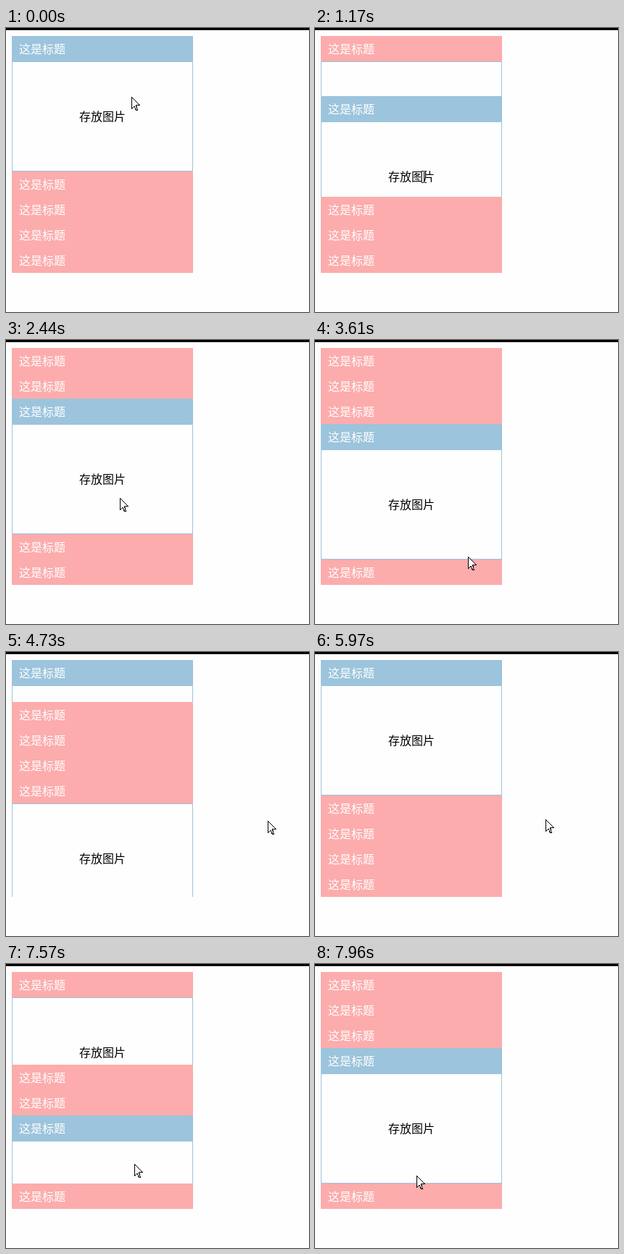
Write an HTML page that moves like this. It is 418 px wide and 392 px high and loops after 8 s.

```html
<!DOCTYPE html>
<html lang="zh-CN">
<head>
<meta charset="utf-8">
<style>
html, body { margin: 0; width: 100%; height: 100%; overflow: hidden; background: #fefefe; }
body { position: relative; font: 16px "Noto Sans CJK SC", "Noto Sans CJK", sans-serif; }
#bar { position: absolute; top: 0; left: 0; width: 100%; height: 3px; background: #000; }
#list { position: absolute; left: 8px; top: 11px; width: 250px; height: 327px; overflow: hidden; }
.item { position: absolute; left: 0; width: 250px; }
.head { height: 35px; line-height: 35px; padding-left: 10px; color: #fff; background: #fcacac; font-weight: 500; }
.active .head { background: #9cc4dc; }
.body { height: 150px; line-height: 148px; border: 1px solid #9cc4dc; background: #fefefe; color: #000; text-align: center; }
svg { position: absolute; left: 0; top: 0; overflow: visible; shape-rendering: crispEdges; }
</style>
</head>
<body>
<div id="bar"></div>
<div id="list"></div>
<svg width="12" height="19">
  <path id="arrow" d="M.5.5V16.5L4 13 6.5 18.5H8.5L6.7 12.5V11.5H11.5Z" fill="#fff" stroke="#000"/>
  <path id="beam" d="M-3-7.5H0M1-7.5H4M.5-7V8M-3 8.5H0M1 8.5H4" fill="none" stroke="#000"/>
</svg>
<script>
const LOOP = 8000, SLIDE = 500, HEAD = 35, BODY = 152;

// Hovered item: [time, index]; the first one opens when nothing is hovered
const opens = [[-SLIDE, 0], [970, 1], [1560, 2], [2850, 3], [3650, 4], [4664, 0], [6130, 1], [6834, 0], [7450, 3]];

// Pointer stops: [time, x, y]
const path = [[0, 173, 95], [1170, 150, 205], [1600, 154, 238], [2440, 157, 218], [3610, 211, 299],
  [4430, 225, 305], [4730, 361, 233], [5400, 332, 237], [5800, 332, 237], [6780, 250, 204],
  [6900, 370, 195], [7700, 140, 292], [LOOP, 140, 292]];

const $ = id => document.getElementById(id);
const lastBefore = (rows, t) => rows.findLastIndex(r => r[0] <= t);

$('list').innerHTML =
  '<div class="item"><div class="head">这是标题</div><div class="body">存放图片</div></div>'.repeat(5);
const items = [...document.querySelectorAll('.item')];
const svg = document.querySelector('svg');

// cubic-bezier(.25, .1, .25, 1)
function ease(x) {
  if (x >= 1) return 1;
  let lo = 0, hi = 1, s;
  for (let i = 0; i < 24; i++) {
    s = (lo + hi) / 2;
    if (.75 * s * (1 - s) + s ** 3 < x) lo = s; else hi = s;
  }
  return .3 * s * (1 - s) ** 2 + 3 * s * s * (1 - s) + s ** 3;
}

function pointer(t) {
  const i = lastBefore(path, t);
  const [t0, x0, y0] = path[i], [t1, x1, y1] = path[i + 1], k = (t - t0) / (t1 - t0);
  return [Math.round(x0 + (x1 - x0) * k), Math.round(y0 + (y1 - y0) * k)];
}

function draw(t) {
  const n = lastBefore(opens, t), [since, active] = opens[n];
  const previous = n ? opens[n - 1][1] : active;
  const k = ease((t - since) / SLIDE);
  const top = i => Math.round(HEAD * i + BODY * ((i > active) * k + (i > previous) * (1 - k)));
  items.forEach((item, i) => {
    item.style.top = top(i) + 'px';
    item.classList.toggle('active', i === active);
  });

  const [x, y] = pointer(t), textY = 11 + top(active) + HEAD + BODY / 2;
  const overText = x > 100 && x < 166 && Math.abs(y - textY) < 11;
  svg.style.transform = `translate(${x}px, ${y}px)`;
  $('arrow').style.display = overText ? 'none' : '';
  $('beam').style.display = overText ? '' : 'none';
}

const begin = performance.now();
function frame() {
  draw((performance.now() - begin) % LOOP);
  requestAnimationFrame(frame);
}
frame();
</script>
</body>
</html>
```
